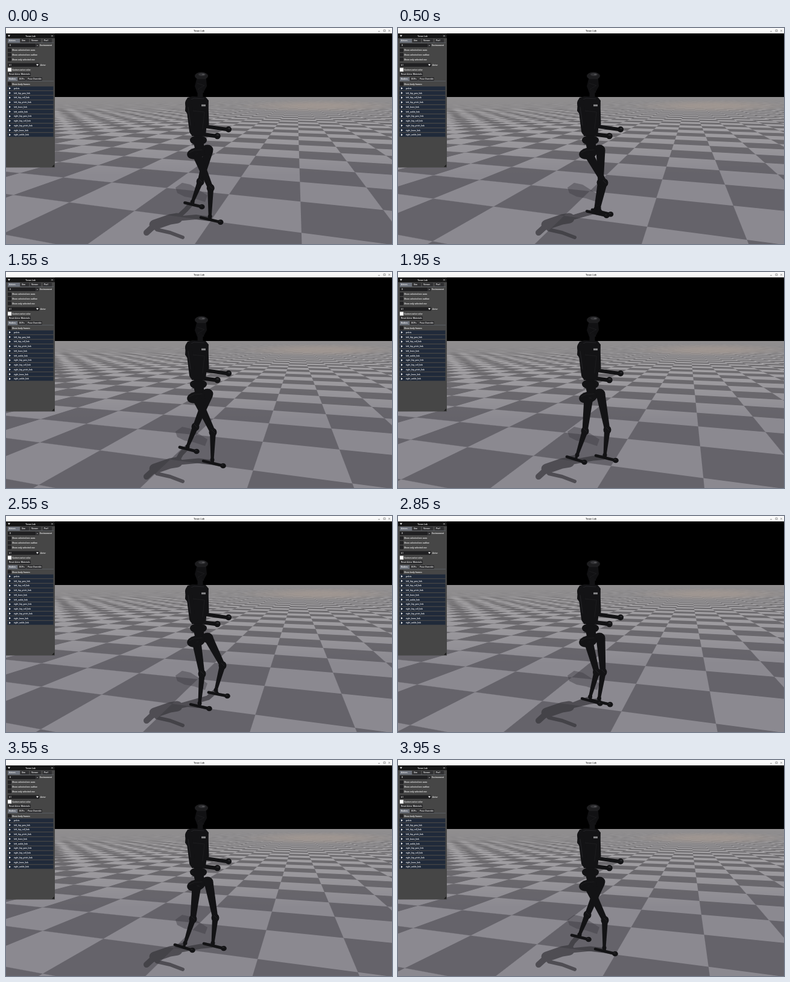
Animation of 640x360 px, one loop 4000 ms. Source, as an HTML page with a canvas:

```html
<!DOCTYPE html>
<html lang="en">
<head>
<meta charset="utf-8">
<title>Walking robot</title>
<style>
  html, body { margin: 0; width: 100%; height: 100%; overflow: hidden; background: #000; }
  canvas, svg { position: absolute; left: 0; top: 0; width: 640px; height: 360px; }
  text { font-family: Roboto, "Open Sans", sans-serif; font-size: 3.6px; font-weight: 500; fill: #f2f2f2; }
</style>
</head>
<body>
<canvas id="view" width="640" height="360"></canvas>
<svg id="ui" viewBox="0 0 640 360" xmlns="http://www.w3.org/2000/svg"></svg>
<script>
const LOOP = 4000, STEP = 50, GAIT = 800;
const ctx = document.getElementById('view').getContext('2d');

// ---------- floor ----------
// Tile coordinates are affine in 1/(y - horizon) and (x - vanish)/(y - horizon).
const HORIZON = 112, TOP = 115, VANISH = 483;
const COL = 0.715, ROW = 1.28e-3, SKEW = 5.776e-4, SPEED = 6.97e-4;
const floorImg = ctx.createImageData(640, 360 - TOP);

const ramp = x => { const m = x - 2 * Math.floor(x / 2); return m < 1 ? m : 2 - m; };
const wave = (x, w) => (ramp(x + w / 2) - ramp(x - w / 2)) / w;

function drawFloor(t) {
  const px = floorImg.data;
  let k = 0;
  for (let y = TOP; y < 360; y++) {
    const d = 1 / (y + 0.5 - HORIZON);
    const wv = Math.max(d * d / ROW, 0.004);
    const far = Math.max(0, 1 - (y - TOP) / 130);
    const mid = 120 + 24 * far, amp = 19 + 11 * far;
    for (let x = 0; x < 640; x++) {
      const l = (x + 0.5 - VANISH) * d;
      const u = (l - 0.03 + SPEED * t) / COL;
      const v = (d - 5.6e-3 + (l - 0.1) * SKEW) / ROW;
      const wu = d * (1 + Math.abs(l) * 0.6) / COL;
      const c = mid + amp * wave(u, wu) * wave(v, wv);
      px[k++] = c;
      px[k++] = c - 2;
      px[k++] = c + 5 - 6 * far;
      px[k++] = 255;
    }
  }
  ctx.putImageData(floorImg, 0, TOP);

  // warm haze in the distance
  ctx.save();
  ctx.translate(520, 130);
  ctx.scale(1, 0.075);
  const haze = ctx.createRadialGradient(0, 0, 40, 0, 0, 135);
  haze.addColorStop(0, 'rgba(164,153,146,.75)');
  haze.addColorStop(1, 'rgba(164,153,146,0)');
  ctx.fillStyle = haze;
  ctx.fillRect(-140, -140, 280, 280);
  ctx.restore();
}

// ---------- walk cycle ----------
// Each joint: four x,y poses, a quarter of the gait apart.
const legs = {
  far: {
    hip: [336, 204],
    knee: [[314, 258], [359, 249], [347, 263], [332, 256]],
    ankle: [[301, 291], [348, 290], [343, 305], [322, 300]],
    heel: [[288, 292], [336, 294], [328, 306], [308, 304]],
    toe: [[316, 299], [367, 300], [361, 314], [340, 311]]
  },
  near: {
    hip: [316, 210],
    knee: [[343, 267], [325, 263], [310, 265], [350, 257]],
    ankle: [[342, 313], [321, 312], [297, 305], [343, 300]],
    heel: [[327, 315], [306, 314], [280, 308], [333, 303]],
    toe: [[360, 323], [337, 321], [309, 317], [364, 310]]
  }
};

function at(keys, phase) {
  const i = Math.floor(phase * 4), s = phase * 4 - i;
  const p = n => keys[(i + n + 3) % 4];
  return [0, 1].map(a => {
    const p0 = p(0)[a], p1 = p(1)[a], p2 = p(2)[a], p3 = p(3)[a];
    return p1 + 0.5 * s * (p2 - p0 + s * (2 * p0 - 5 * p1 + 4 * p2 - p3 + s * (3 * (p1 - p2) + p3 - p0)));
  });
}

function pose(leg, phase) {
  const out = { hip: leg.hip };
  for (const j of ['knee', 'ankle', 'heel', 'toe']) out[j] = at(leg[j], phase);
  return out;
}

// ---------- drawing helpers ----------
function bar(color, width, ...pts) {
  ctx.strokeStyle = color;
  ctx.lineWidth = width;
  ctx.lineCap = ctx.lineJoin = 'round';
  ctx.beginPath();
  pts.forEach(p => ctx.lineTo(p[0], p[1]));
  ctx.stroke();
}
function oval(color, x, y, rx, ry = rx, turn = 0) {
  ctx.fillStyle = color;
  ctx.beginPath();
  ctx.ellipse(x, y, rx, ry, turn, 0, 7);
  ctx.fill();
}
function poly(color, ...pts) {
  ctx.fillStyle = color;
  ctx.beginPath();
  pts.forEach(p => ctx.lineTo(p[0], p[1]));
  ctx.fill();
}
function taper(color, a, b, wa, wb) {
  const dx = b[0] - a[0], dy = b[1] - a[1], n = Math.hypot(dx, dy) * 2;
  const nx = -dy / n, ny = dx / n;
  poly(color, [a[0] + nx * wa, a[1] + ny * wa], [b[0] + nx * wb, b[1] + ny * wb],
    [b[0] - nx * wb, b[1] - ny * wb], [a[0] - nx * wa, a[1] - ny * wa]);
}

// ---------- shadow ----------
const shade = document.createElement('canvas');
shade.width = 640;
shade.height = 360;
const shadeCtx = shade.getContext('2d');

function drawShadow(poses) {
  // soft second shadow behind the legs
  const soft = 'rgba(60,58,64,.42)';
  poly(soft, [281, 266], [292, 258], [306, 261], [317, 268], [334, 279], [330, 290], [312, 284], [296, 281], [284, 275]);

  shadeCtx.clearRect(0, 0, 640, 360);
  shadeCtx.lineCap = shadeCtx.lineJoin = 'round';
  const line = (w, ...pts) => {
    shadeCtx.lineWidth = w;
    shadeCtx.beginPath();
    pts.forEach(p => shadeCtx.lineTo(p[0], p[1]));
    shadeCtx.stroke();
  };
  shadeCtx.strokeStyle = '#38373c';
  line(17, [246, 328], [272, 319], [284, 317]);
  line(10, [233, 341], [246, 329]);
  line(6, [250, 336], [272, 341], [293, 349]);
  for (const p of poses) {
    const knee = [p.knee[0] - 24, p.ankle[1] * 0.5 + 158];
    line(8, [282, 318], knee, [p.ankle[0] - 3, p.ankle[1] + 4]);
    line(5, p.heel, p.toe);
  }
  ctx.globalAlpha = 0.72;
  ctx.drawImage(shade, 0, 0);
  ctx.globalAlpha = 1;
}

// ---------- robot ----------
const INK = '#131315', EDGE = '#29292c', DIM = '#1d1d1f';

function drawLeg(p) {
  taper(INK, p.hip, p.knee, 15, 9);
  taper(INK, p.knee, p.ankle, 10, 5);
  oval(INK, p.knee[0], p.knee[1], 6.5, 7);
  bar(EDGE, 0.8, [p.knee[0] - 2, p.knee[1] - 4], [p.knee[0] + 3, p.knee[1] + 1]);
  oval(INK, p.ankle[0], p.ankle[1], 3.5);
  bar(INK, 4.5, p.heel, p.toe);
  bar(INK, 4, p.ankle, [(p.heel[0] + p.toe[0]) / 2, (p.heel[1] + p.toe[1]) / 2]);
  oval(INK, p.toe[0], p.toe[1], 4.8, 4.3);
  oval(EDGE, p.toe[0] - 1, p.toe[1] - 1.5, 1.8, 0.8);
}

function drawBody() {
  // head and neck
  oval(DIM, 324, 80, 11, 6.5);
  oval('#343437', 325, 77.5, 6, 2.6);
  oval('#565659', 327, 77.5, 2.2, 1.1);
  poly('#111113', [316, 85], [332, 85], [333, 97], [327, 108], [317, 108], [313, 97]);
  bar('#1b1b1d', 1, [317, 92], [329, 96], [318, 102], [328, 107]);
  bar(INK, 9, [322, 106], [322, 117]);

  // far arm
  bar(INK, 9, [331, 126], [332, 160]);
  bar(INK, 6, [331, 164], [366, 169]);
  oval(INK, 369, 169, 5);
  oval(EDGE, 370, 167.5, 2, 1.5);

  // torso
  poly(INK, [301, 116], [309, 114], [331, 115], [336, 121], [335, 136], [333, 158], [331, 180], [308, 180], [303, 160], [302, 145], [297, 138], [298, 122]);
  bar(EDGE, 0.8, [305, 120], [312, 117], [328, 118]);
  bar(DIM, 1, [309, 138], [329, 140], [326, 168]);
  ctx.fillStyle = '#8a8a8c';
  ctx.fillRect(324, 127.5, 7, 3);

  // near arm
  oval(INK, 303, 126, 6, 9);
  bar(INK, 10, [304, 132], [309, 172]);
  bar(EDGE, 0.8, [302, 132], [306, 162]);
  bar(INK, 6.5, [309, 175], [348, 180]);
  oval(INK, 350.5, 180, 5.2);
  oval(EDGE, 351, 178.3, 2.2, 1.5);

  // waist and pelvis
  oval(INK, 319, 187, 14, 8);
  oval(EDGE, 316, 193, 9, 0.8, -0.15);
  bar(INK, 16, [319, 190], [322, 204]);
  oval(INK, 334, 203, 9.5, 8.5);
  oval(INK, 315, 209, 15, 9.5, -0.2);
  bar(DIM, 1.2, [304, 208], [312, 204], [325, 203]);
  oval(EDGE, 318, 212, 4, 2.5);
}

function draw(t) {
  ctx.fillStyle = '#000';
  ctx.fillRect(0, 0, 640, TOP);
  drawFloor(t);
  const phase = ((t + 50) % GAIT) / GAIT;
  const far = pose(legs.far, phase), near = pose(legs.near, phase);
  drawShadow([far, near]);
  drawLeg(far);
  drawBody();
  drawLeg(near);
}

// ---------- window and side panel ----------
const NAME = 'Tovan Lab';
let svg = '';
const box = (x, y, w, h, fill) => svg += `<rect x="${x}" y="${y}" width="${w}" height="${h}" fill="${fill}"/>`;
const label = (x, y, s, extra = '') => svg += `<text x="${x}" y="${y}" ${extra}>${s}</text>`;
const path = (d, attrs) => svg += `<path d="${d}" ${attrs}/>`;
const white = 'fill="#f2f2f2"', thin = 'fill="none" stroke="#777" stroke-width=".7"';

box(0, 0, 640, 9, '#fafafa');
label(320, 6, NAME, 'text-anchor="middle" style="fill:#333;font-size:4px"');
path('M617 5.5h3M626 3h3v3h-3zM634 3l3 3m0-3l-3 3', thin);

box(0, 9.5, 81, 223, '#464646');
box(0, 9.5, 81, 7.5, '#161616');
path('M3 11.8h4l-2 3z', white);
label(40.5, 14.6, NAME, 'text-anchor="middle"');
path('M75 11.7l3 3m0-3l-3 3', 'stroke="#ddd" stroke-width=".6"');

function tabs(y, list) {
  list.forEach(([x, w, s], i) => {
    box(x, y, w, 6.2, i ? '#303032' : '#6d727c');
    label(x + 2, y + 4.4, s);
  });
  box(2, y + 6.2, 77, 0.5, '#6d727c');
}
tabs(18, [[3, 20, 'Actors'], [24, 14, 'Sim'], [40, 18, 'Viewer'], [61, 15, 'Perf']]);

box(3, 26, 46, 6, '#202022');
label(6, 30.4, '0');
box(49.5, 26, 5, 6, '#2d2d2f');
label(51, 30.4, '+');
label(56, 30.4, 'Environment');

function check(y, s, fill = '#222224') {
  box(3, y - 3, 6, 6, fill);
  label(10, y + 1.3, s);
}
check(37, 'Show selected env axes');
check(44.6, 'Show selected env outline');
check(52.3, 'Show only selected env');

box(3, 58.5, 52, 6.2, '#202022');
label(5, 62.9, 'h1');
path('M50 60.3h4l-2 3z', white);
label(57, 62.9, 'Actor');
check(69.5, 'Custom actor color', '#fff');
box(3, 74, 38, 6.2, '#272729');
label(5, 78.4, 'Reset Actor Materials');
tabs(82, [[3, 16, 'Bodies'], [20, 13, 'DOFs'], [34, 26, 'Pose Override']]);
check(93.2, 'Show body frames');

const parts = ['hip_yaw', 'hip_roll', 'hip_pitch', 'knee', 'ankle'];
const links = ['pelvis', ...['left', 'right'].flatMap(s => parts.map(p => `${s}_${p}_link`))];
links.forEach((s, i) => {
  const y = 100.6 + 7.75 * i;
  box(2.5, y - 3.2, 76, 6.4, '#202a3a');
  path(`M5 ${y - 1.8}v3.6l3-1.8z`, white);
  label(13, y + 1.2, s);
});
path('M80 227.5v4h-4z', 'fill="#1c1c1c"');
document.getElementById('ui').innerHTML = svg;

// ---------- clock ----------
const start = performance.now();
let last = -1;
function tick() {
  const t = Math.floor(((performance.now() - start) % LOOP) / STEP) * STEP;
  if (t !== last) draw(last = t);
  requestAnimationFrame(tick);
}
tick();
</script>
</body>
</html>
```
